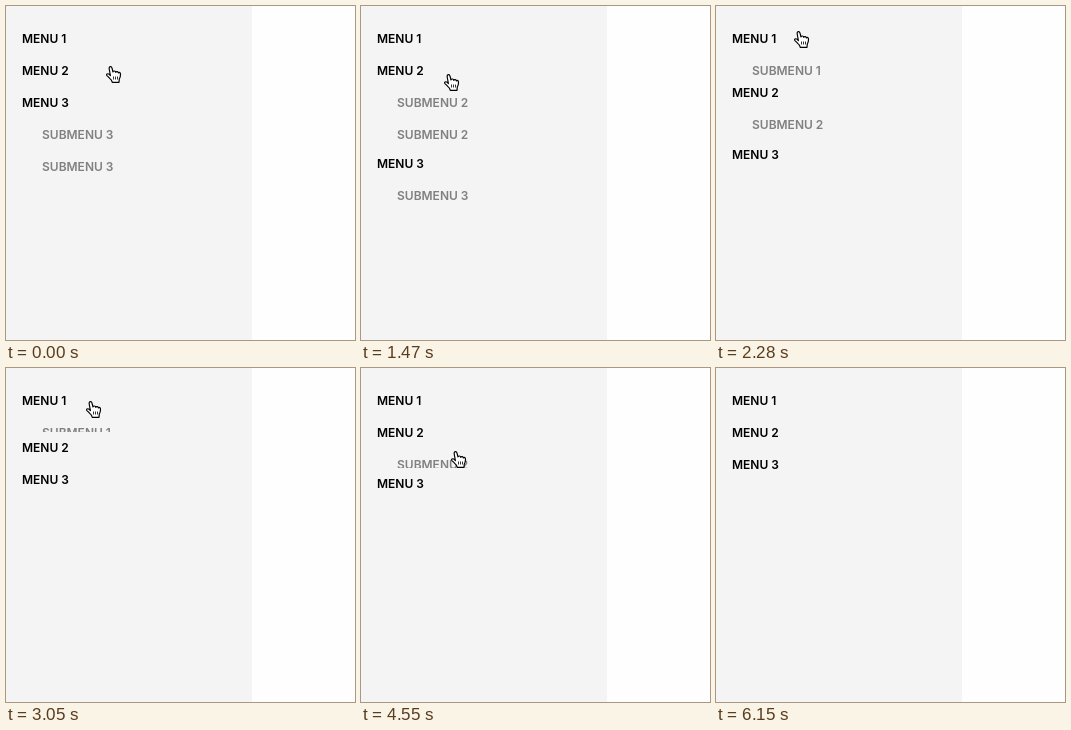
Write an HTML page with a canvas that moves like this. It is 349 by 334 pixels and loops after 6580 ms.

```html
<!DOCTYPE html>
<html lang="en">
<head>
<meta charset="utf-8">
<title>Accordion menu</title>
<style>
  html, body { margin: 0; width: 100%; height: 100%; overflow: hidden; background: #fefefe; }
  canvas { display: block; }
</style>
</head>
<body>
<canvas id="stage" width="349" height="334"></canvas>
<script>
const ctx = document.getElementById('stage').getContext('2d');
const LOOP = 6580, SLIDE = 400;
const SIDEBAR = 246, TOP = 17, ROW = 32, BASELINE = 20;

const itemCounts = [1, 3, 2];

// Which menu is hovered from when on; 0 means none.
const hovers = [
  { at: -SLIDE, menu: 3 }, { at: 1235, menu: 2 }, { at: 2033, menu: 1 }, { at: 2845, menu: 0 },
  { at: 3515, menu: 2 }, { at: 4268, menu: 0 }, { at: 4940, menu: 3 }, { at: 5840, menu: 0 },
];

const cursorStart = { x: 100, y: 60 };
const cursorMoves = [
  { from: 0, to: 560, x: 350, y: -45 },     // out at the top right
  { from: 600, to: 720, x: 350, y: 85 },    // beside the stage
  { from: 720, to: 940, x: 83, y: 68 },     // to menu 2
  { from: 1640, to: 1870, x: 78, y: 25 },   // to menu 1
  { from: 2930, to: 3340, x: 89, y: 65 },   // to menu 2
  { from: 4265, to: 4740, x: 90, y: 92 },   // to menu 3
  { from: 5735, to: 6250, x: 250, y: 380 }, // out at the bottom
];

const hand = new Path2D(
  'M4.4 9.5 L3.2 3 Q3 .8 4.4 .7 Q5.6 .6 6 2.2 L7 6 Q7.2 4.9 8.4 5 Q9.5 5.1 9.8 6.3 ' +
  'Q10.3 5.3 11.3 5.6 Q12.3 5.9 12.4 7 Q13 6.2 13.8 6.6 Q14.6 7 14.5 8.5 ' +
  'Q14.5 11 13.3 13 L13 16.3 H6.3 Q5.8 14.2 4 12.6 Q2.2 10.8 .9 9.6 ' +
  'Q.2 8.6 1 8 Q2 7.4 3.2 8.3 Z');
const fingers = new Path2D('M7.5 10.5 V13.5 M9.5 10.5 V13.5 M11.5 10.5 V13.5');

// Eased progress from 0 to 1 between two times.
function swing(t, from, to) {
  const p = Math.min(1, Math.max(0, (t - from) / (to - from)));
  return 0.5 - Math.cos(Math.PI * p) / 2;
}

function openness(menu, t) {
  let level = 0;
  for (const hover of hovers) {
    const goal = hover.menu === menu ? 1 : 0;
    level += (goal - level) * swing(t, hover.at, hover.at + SLIDE);
  }
  return level;
}

function cursorAt(t) {
  let { x, y } = cursorStart;
  for (const move of cursorMoves) {
    const p = swing(t, move.from, move.to);
    x += (move.x - x) * p;
    y += (move.y - y) * p;
  }
  return [Math.round(x), Math.round(y)];
}

function drawLabel(text, x, rowTop, color) {
  ctx.fillStyle = color;
  ctx.fillText(text, x, rowTop + BASELINE);
}

function drawMenus(t) {
  ctx.font = '600 12px Inter, sans-serif';
  let y = TOP;
  itemCounts.forEach((count, i) => {
    const number = i + 1;
    drawLabel(`MENU ${number}`, 16, y, '#000');
    y += ROW;
    const height = Math.round(openness(number, t) * count * ROW);
    ctx.save();
    ctx.beginPath();
    ctx.rect(0, y, SIDEBAR, height);
    ctx.clip();
    for (let n = 0; n < count; n++) drawLabel(`SUBMENU ${number}`, 36, y + n * ROW, '#808080');
    ctx.restore();
    y += height;
  });
}

function drawCursor(t) {
  ctx.save();
  ctx.translate(...cursorAt(t));
  ctx.fillStyle = '#fff';
  ctx.strokeStyle = '#000';
  ctx.lineJoin = 'round';
  ctx.lineWidth = 1.2;
  ctx.fill(hand);
  ctx.stroke(hand);
  ctx.lineWidth = 0.8;
  ctx.stroke(fingers);
  ctx.restore();
}

function draw() {
  const t = performance.now() % LOOP;
  ctx.fillStyle = '#fefefe';
  ctx.fillRect(0, 0, 349, 334);
  ctx.fillStyle = '#f4f4f4';
  ctx.fillRect(0, 0, SIDEBAR, 334);
  drawMenus(t);
  drawCursor(t);
  requestAnimationFrame(draw);
}
draw();
</script>
</body>
</html>
```
